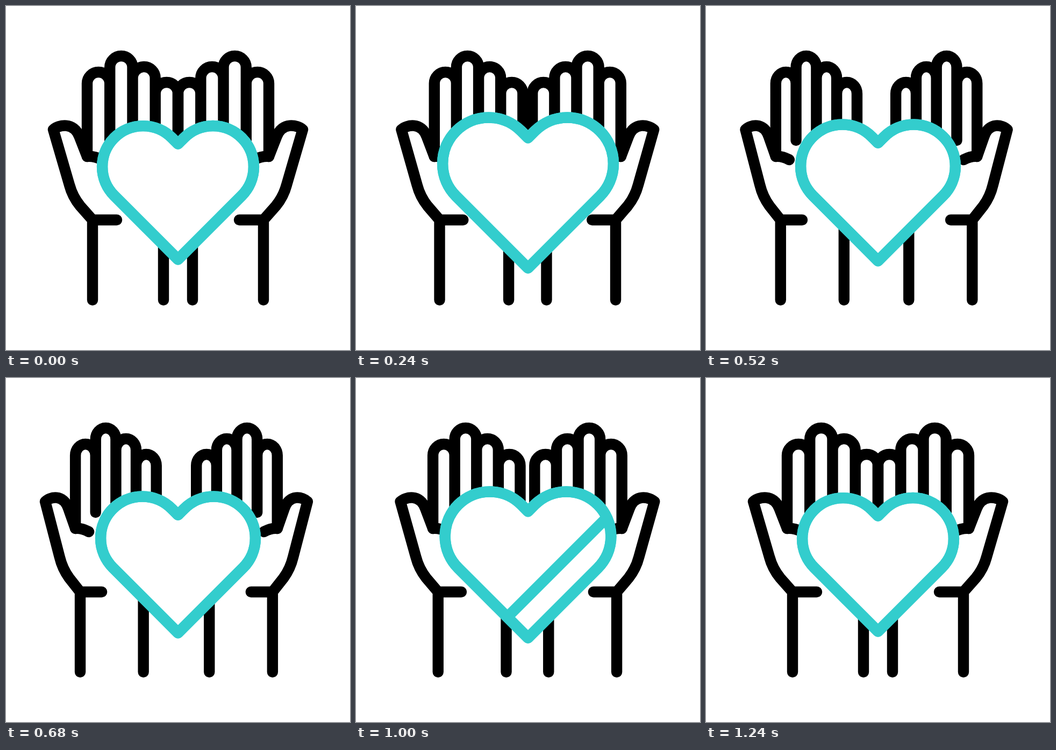
Write an HTML page that moves like this. It is 640x640 px and loops after 1880 ms.

```html
<!DOCTYPE html>
<html lang="en">
<head>
<meta charset="utf-8">
<title>Hands and heart</title>
<style>
  html, body { margin: 0; width: 100%; height: 100%; overflow: hidden; background: #fff; }
  svg { display: block; width: 100%; height: 100%; }
  path { fill: none; stroke: #000; stroke-width: 20.4; stroke-linecap: round; stroke-linejoin: round; vector-effect: non-scaling-stroke; }
  .teal { stroke: #33cdcd; }
  #heart { fill: #fff; }
</style>
</head>
<body>
<svg viewBox="0 0 640 640">
  <defs>
    <!-- x is the distance from the middle axis -->
    <g id="hand">
      <path d="M159 547V398H114 M159 398L182 372C191 361 198 348 202 333L232 230C222 221 194 215 183.5 243L169 280C158 279 150 282 141 286"/>
      <path d="M169 280V144a21.1 21 0 0 0 -42.2 0V250 M126.8 250V114a21.1 21 0 0 0 -42.3 0V250 M84.5 250V134a21.1 21 0 0 0 -42.2 0V250 M42.3 250V163a21.1 21 0 0 0 -42.3 0V320C0 350 27 340 27 370V547"/>
    </g>
    <clipPath id="clip"><path id="mask"/></clipPath>
  </defs>
  <use href="#hand" id="left"/>
  <use href="#hand" id="right"/>
  <path id="heart" class="teal"/>
  <g clip-path="url(#clip)"><path id="stripe" class="teal" d="M-300 300L300 -300"/></g>
  <path id="outline" class="teal"/>
</svg>
<script>
const LOOP = 1880, STEP = 40;
// the lobes are exact half circles
const HEART = "M320 471.5L201.3 352.7A75 75 0 0 1 308.7 245.3L320 256.6L331.3 245.3A75 75 0 0 1 438.7 352.7Z";
const SPREAD = [[40, 0], [600, 1], [680, 1], [1240, 0]];
const BEAT = [[40, 1], [320, 1.149], [600, 1], [880, 1.149], [1160, 1]];
const SWEEP = [[680, 413], [1240, 903]];

const $ = id => document.getElementById(id);
const place = (id, transform) => $(id).setAttribute("transform", transform);
const heartIds = ["heart", "mask", "outline"];
heartIds.forEach(id => $(id).setAttribute("d", HEART));

// cubic-bezier(.5, 0, .5, 1), solved by bisection
function ease(x) {
  let lo = 0, hi = 1;
  for (let i = 0; i < 24; i++) {
    const s = (lo + hi) / 2;
    if (1.5 * s * (1 - s) + s * s * s < x) lo = s;
    else hi = s;
  }
  return lo * lo * (3 - 2 * lo);
}

function track(keys, t) {
  if (t <= keys[0][0]) return keys[0][1];
  for (let i = 1; i < keys.length; i++) {
    const [t0, a] = keys[i - 1], [t1, b] = keys[i];
    if (t < t1) return a + (b - a) * ease((t - t0) / (t1 - t0));
  }
  return keys[keys.length - 1][1];
}

function draw(time) {
  const t = Math.floor((time % LOOP) / STEP) * STEP;
  const p = track(SPREAD, t), k = 1 - 0.109 * p;
  place("left", `translate(${320 - 40.3 * p} 0) scale(${-k} 1)`);
  place("right", `translate(${320 + 34.2 * p} 0) scale(${k} 1)`);

  const size = track(BEAT, t);
  heartIds.forEach(id => place(id, `translate(320 345) scale(${size}) translate(-320 -345)`));

  const half = track(SWEEP, t) / 2;
  place("stripe", `translate(${half} ${half})`);
}

const start = performance.now();
function tick() {
  draw(performance.now() - start);
  requestAnimationFrame(tick);
}
tick();
</script>
</body>
</html>
```
